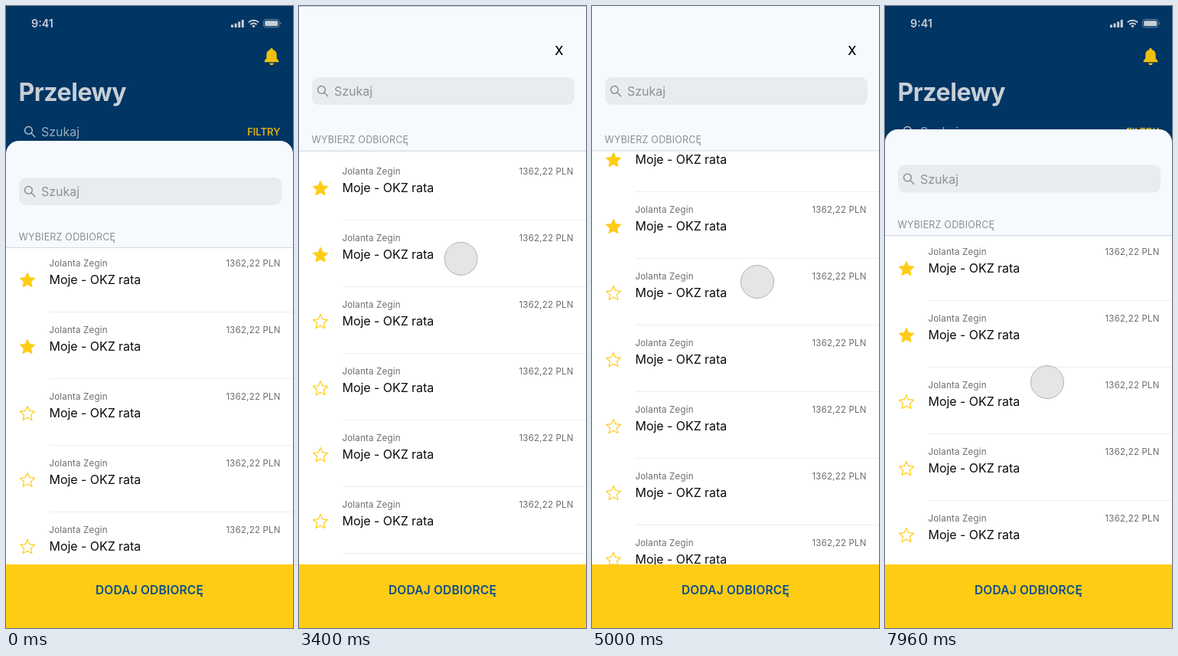
Write an HTML page that moves like this. It is 375x812 px and loops after 8000 ms.

```html
<!DOCTYPE html>
<html lang="pl">
<head>
<meta charset="utf-8">
<title>Przelewy</title>
<style>
html, body { margin: 0; width: 100%; height: 100%; overflow: hidden; background: #003564; }
svg { display: block; width: 375px; height: 812px; font-family: Inter, Roboto, sans-serif; }
.title { font-size: 32px; font-weight: 700; letter-spacing: -.45px; }
.field { font-size: 16px; }
.small { font-size: 11.5px; letter-spacing: .2px; fill: #6c6c6c; }
.name { font-size: 16px; letter-spacing: -.05px; fill: #0c0c0c; }
.section { font-size: 12.5px; letter-spacing: .2px; fill: #8b9096; }
.button { font-size: 15.5px; font-weight: 600; letter-spacing: .2px; fill: #0a4d8c; }
</style>
</head>
<body>
<svg viewBox="0 0 375 812">
  <defs>
    <g id="lens" fill="none" stroke-width="1.4" stroke-linecap="round">
      <circle cx="29.4" cy="16.4" r="4.9"/>
      <path d="M33 20l4.8 4.8"/>
    </g>
    <path id="star"/>
  </defs>

  <rect width="375" height="812" fill="#003564"/>
  <g fill="#c7ced6">
    <text x="33" y="28" font-size="14.3" font-weight="600">9:41</text>
    <path d="M294 24.5h3v3.5h-3zM298.6 22.7h3v5.3h-3zM303.2 20.5h3v7.5h-3zM307.8 18h3v10h-3z"/>
    <g fill="none" stroke="#c7ced6" stroke-width="2">
      <path d="M316.8 21.4a9.6 9.6 0 0 1 13.4 0M319.4 24.2a5.8 5.8 0 0 1 8.2 0"/>
    </g>
    <path d="M323.5 28.4l-2.3-2.4a3.3 3.3 0 0 1 4.6 0z"/>
    <rect x="336.5" y="17.5" width="20.5" height="10.5" rx="3" fill="none" stroke="#c7ced6" stroke-opacity=".5"/>
    <rect x="338.2" y="19.2" width="17.1" height="7.1" rx="1.6"/>
    <path d="M358.3 21v3.6q1.4-.5 1.4-1.8t-1.4-1.8z" opacity=".5"/>
    <text class="title" x="16.5" y="124">Przelewy</text>
  </g>
  <path fill="#eec00f" d="M347 55c1.2 0 1.8.8 1.8 1.9 3.3.9 4.9 3.6 4.9 7v4.6l2.6 3v1.7h-18.600v-1.700l2.600-3v-4.600c0-3.400 1.600-6.100 4.900-7 0-1.100.600-1.900 1.800-1.900zM344.300 74.500h5.400a2.700 2.600 0 0 1-5.400 0z"/>
  <use href="#lens" y="146" stroke="#b3bfcb"/>
  <text class="field" x="46" y="170" fill="#9aabbd">Szukaj</text>
  <text x="358.500" y="168.700" text-anchor="end" font-size="13" font-weight="600" fill="#d9b116">FILTRY</text>

  <rect id="paper" width="375" height="812" fill="#fff"/>
  <g id="list"></g>
  <path id="head" fill="#f6fafe"/>
  <rect id="rule" width="375" height="1" fill="#d3d9df"/>
  <text id="close" class="field" x="339.800" y="63.800" text-anchor="middle" font-weight="500">X</text>
  <g id="search">
    <rect x="17" width="343" height="36" rx="9" fill="#e9ecef"/>
    <use href="#lens" stroke="#868b90"/>
    <text class="field" x="46" y="24" fill="#8d9196">Szukaj</text>
  </g>
  <text id="section" class="section" x="16.500">WYBIERZ ODBIORCĘ</text>

  <rect y="729" width="375" height="83" fill="#ffcc15"/>
  <text class="button" x="187.500" y="768" text-anchor="middle">DODAJ ODBIORCĘ</text>
  <circle id="touch" stroke="#b2b2b2"/>
</svg>
<script>
const LOOP = 8000, STEP = 40, ROW = 87;
const $ = id => document.getElementById(id);
const set = (id, attrs) => {
  for (const key in attrs) $(id).setAttribute(key, attrs[key]);
};
const clamp = v => Math.min(1, Math.max(0, v));

// time, list offset
const scroll = [
  [2760, 0], [3000, 44], [3600, 153], [3880, 187], [4440, 218], [4480, 218],
  [4700, 200], [5000, 157], [5280, 108.5], [5400, 88], [5700, 42], [6040, 15]
];
// time, x, y
const path = [
  [240, 346, -24], [1080, 228, 430], [1440, 226, 471], [1920, 212, 396],
  [2280, 203, 350], [2640, 203, 453], [2760, 203, 453], [3000, 209, 409],
  [3600, 212, 300], [3880, 212, 278], [4440, 213, 299], [4480, 213, 299],
  [4700, 213.5, 317], [5000, 216, 360], [5280, 219, 408.5], [5400, 220, 429],
  [5700, 216, 475], [6040, 209, 502], [6320, 209, 502], [6360, 208, 505],
  [6720, 203, 534], [6840, 203, 534], [7300, 220, 437], [7680, 220, 472], [7800, 212, 491]
];
const presses = [[2680, 3680], [4520, 6080], [7960, LOOP]];

// Monotone cubic through the keys, at rest at both ends.
function sample(keys, t, col) {
  const last = keys.length - 1;
  if (t <= keys[0][0]) return keys[0][col];
  if (t >= keys[last][0]) return keys[last][col];
  const i = keys.findIndex(k => k[0] > t) - 1;
  const slope = n => (keys[n + 1][col] - keys[n][col]) / (keys[n + 1][0] - keys[n][0]);
  const tangent = n => {
    if (n === 0 || n === last) return 0;
    const a = slope(n - 1), b = slope(n);
    return a * b <= 0 ? 0 : 2 * a * b / (a + b);
  };
  const span = keys[i + 1][0] - keys[i][0];
  const u = (t - keys[i][0]) / span, v = 1 - u;
  return keys[i][col] * (1 + 2 * u) * v * v + keys[i + 1][col] * (3 - 2 * u) * u * u
    + span * u * v * (tangent(i) * v - tangent(i + 1) * u);
}

function starPath(r) {
  let d = '';
  for (let n = 0; n < 10; n++) {
    const a = n * Math.PI / 5, q = n % 2 ? r * .47 : r;
    d += (n ? 'L' : 'M') + (q * Math.sin(a)).toFixed(2) + ' ' + (-q * Math.cos(a)).toFixed(2);
  }
  return d + 'Z';
}

function row(i) {
  const end = i === 6;
  return `<g transform="translate(0 ${i * ROW})">
    <use href="#star" x="28" y="358.500" fill="${i < 2 ? '#ffcc15' : 'none'}" stroke="#ffcc15" stroke-width="1.200" stroke-linejoin="round"/>
    <text class="small" x="56.500" y="340">Jolanta Zegin</text>
    <text class="small" x="358.700" y="340" text-anchor="end">1362,22 PLN</text>
    <text class="name" x="56.500" y="363">Moje - OKZ rata</text>
    <rect x="${end ? 0 : 57}" y="399" width="375" height="1" fill="${end ? '#c9c9c9' : '#ededed'}"/>
  </g>`;
}

function draw(now) {
  const t = Math.floor(now % LOOP / STEP) * STEP;
  const s = sample(scroll, t, 1);
  const h = Math.min(s, 120);
  const open = clamp((h - 51) / 69);
  const top = 176 - Math.min(h, 51) - 125 * open;
  const r = 17 * (1 - open);
  const rule = 315.500 - 1.054 * h;

  set('head', { d: `M0 ${rule}V${top + r}A${r} ${r} 0 0 1 ${r} ${top}H${375 - r}A${r} ${r} 0 0 1 375 ${top + r}V${rule}Z` });
  set('paper', { y: rule });
  set('rule', { y: rule - .5 });
  set('section', { y: rule - 9.700 });
  set('search', { transform: `translate(0 ${224 - 1.092 * h})` });
  set('close', { opacity: clamp((h - 70) / 50) });
  set('list', { transform: `translate(0 ${-s})` });

  const down = presses.some(([a, b]) => t >= a && t < b);
  set('touch', {
    cx: sample(path, t, 1),
    cy: sample(path, t, 2),
    r: down ? 21.5 : 22.5,
    fill: down ? 'rgba(226,226,226,.88)' : 'rgba(233,233,233,.88)',
    visibility: t >= 280 ? 'visible' : 'hidden'
  });
}

set('star', { d: starPath(10) });
$('list').innerHTML = Array.from({ length: 8 }, (_, i) => row(i)).join('');

const start = performance.now();
function tick() {
  draw(performance.now() - start);
  requestAnimationFrame(tick);
}
tick();
</script>
</body>
</html>
```
